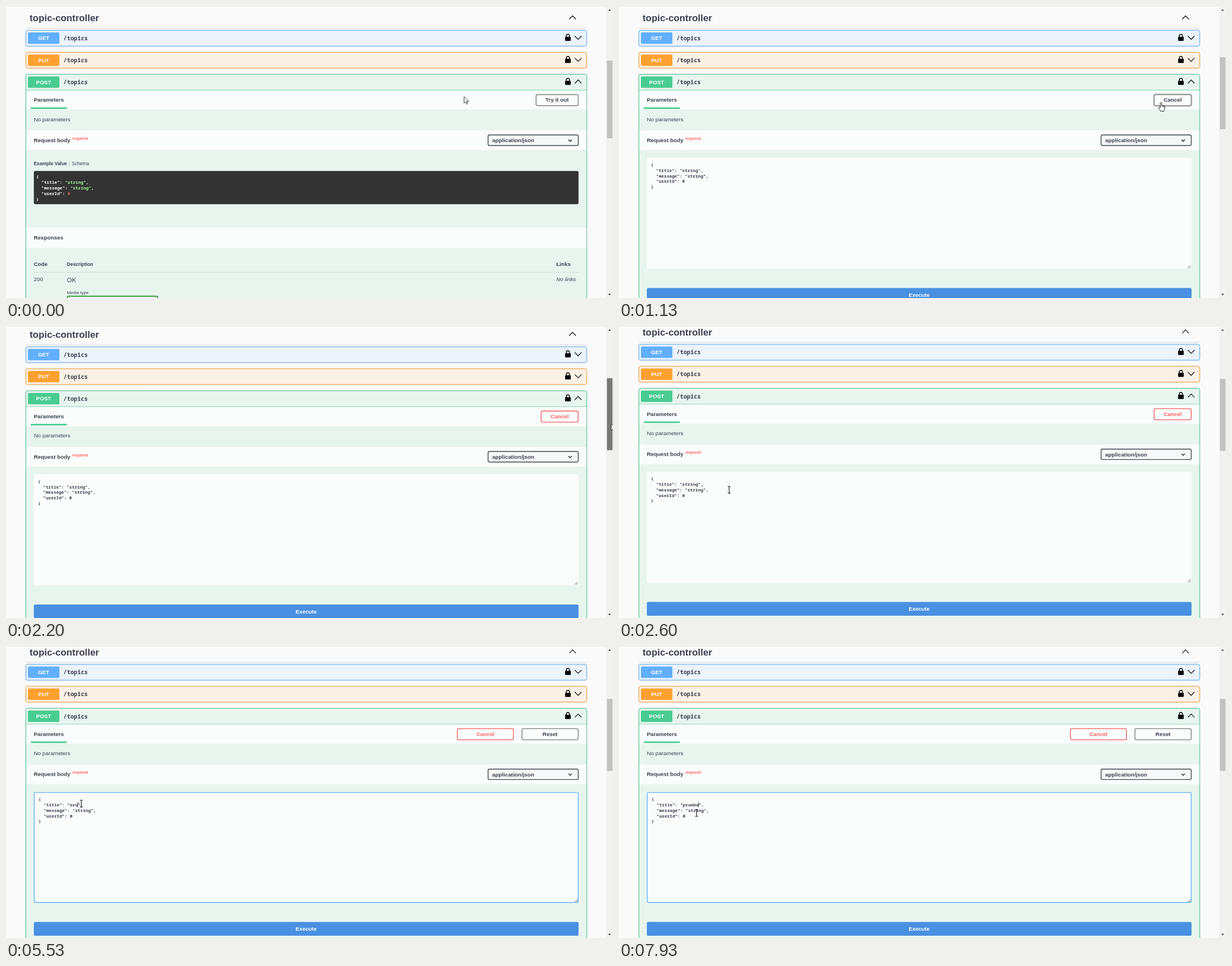
These frames come from a looping animation (1080 px wide and 519 px high, 8 s). An HTML page:

```html
<!DOCTYPE html>
<html lang="en">
<head>
<meta charset="utf-8">
<title>Topic API</title>
<style>
html, body { margin: 0; width: 100%; height: 100%; overflow: hidden; background: #fafafa; }
svg { display: block; width: 100%; height: 100%; font-family: "Liberation Sans", Arial, sans-serif; }
text { white-space: pre; fill: #3b4151; }
.b { font-weight: bold; }
.i { font-style: italic; }
.m { font-family: "Noto Sans Mono", monospace; font-weight: bold; }
.mid { text-anchor: middle; }
.bar { filter: drop-shadow(0 .7px .7px rgba(0,0,0,.13)); }
.row { filter: drop-shadow(0 0 1px rgba(0,0,0,.2)); }
.hover { filter: drop-shadow(0 0 1.8px rgba(0,0,0,.4)); }
</style>
</head>
<body>
<svg id="stage" viewBox="0 0 1080 519"></svg>
<script>
const stage = document.getElementById('stage');
const FPS = 15, TICKS = 120;
const OPEN = 17, FOCUS = 47, SELECT = 52, CHAR = 4.668;
const GREEN = '#49cc90', RED = [255, 96, 96], INK = [59, 65, 81], GRAY = [128, 128, 128];

// Keyframes: tick, then values
const pointer = [[0, 815, 161], [4, 870, 157.5], [8, 964.5, 171.5], [24, 964.5, 171.5], [27, 1076, 173],
  [31, 1076.5, 173], [33, 1077, 174], [35, 1077, 175], [39, 196, 291], [40, 196, 291], [44, 142, 282],
  [48, 134, 280], [108, 134, 280], [110, 145, 301.5], [114, 145, 301.5], [119, 138, 296.5]];
const scrolling = [[31, 0], [33, -6.3], [35, -10.6]];
const typing = [[66, 'r'], [69, 'ru'], [75, 'r'], [76, ''], [78, 'o'], [80, 'or'], [83, 'oru'], [88, 'or'],
  [90, 'o'], [92, ''], [94, 'p'], [95, 'pr'], [97, 'pru'], [99, 'prue'], [100, 'prueb'], [102, 'prueba']];

const clamp = v => Math.max(0, Math.min(1, v));
const mix = (a, b, p) => a + (b - a) * p;
const rgb = (a, b, p) => `rgb(${a.map((v, i) => Math.round(mix(v, b[i], p)))})`;

function at(keys, k) {
  let i = keys.findIndex(key => key[0] > k);
  if (i < 0) i = keys.length;
  const a = keys[Math.max(0, i - 1)], b = keys[Math.min(i, keys.length - 1)];
  const p = a === b ? 0 : clamp((k - a[0]) / (b[0] - a[0]));
  return a.slice(1).map((v, j) => mix(v, b[j + 1], p));
}

// y is the middle of the capitals
const text = (x, y, s, cls = '', size = 9.84, fill = '') =>
  `<text x="${x}" y="${y + size * .355}" class="${cls}" font-size="${size}"${fill && ` style="fill:${fill}"`}>${s}</text>`;
const rect = (x, y, x2, y2, fill, more = '') =>
  `<rect x="${x}" y="${y}" width="${x2 - x}" height="${y2 - y}" fill="${fill}" ${more}/>`;
const path = (d, stroke, width, fill = 'none') =>
  `<path d="${d}" fill="${fill}" stroke="${stroke}" stroke-width="${width}"/>`;
const chevron = (x, y, dir, w = 6, h = 3, width = 1.3, color = '#111') =>
  path(`M${x - w} ${y - h * dir}L${x} ${y + h * dir}L${x + w} ${y - h * dir}`, color, width);
const tint = (s, fill) => `<tspan style="fill:${fill}">${s}</tspan>`;

const code = (x, y, pitch, lines, fill) => lines.map((s, i) =>
  `<text x="${x}" y="${y + i * pitch}" class="m" font-size="7.78" style="fill:${fill}">${s}</text>`).join('');

const json = (title, message = 'string', str = s => s, num = s => s) =>
  ['{', `  "title": ${str(`"${title}"`)},`, `  "message": ${str(`"${message}"`)},`, `  "userId": ${num('0')}`, '}'];

function method(y, bottom, name, color, fill, dir) {
  return rect(35.5, y, 1033, bottom, fill, `rx="2.8" stroke="${color}" stroke-width="1" class="row"`) +
    rect(39, y + 3.8, 95, y + 24, color, 'rx="2"') +
    text(67, y + 13.7, name, 'b mid', 9.84, '#fff') +
    text(102.3, y + 14, '/topics', 'm', 10.3) +
    rect(995, y + 11.5 - 5, 1004.6, y + 18.5, '#000', 'rx="1" display="none"') +
    rect(994.8, y + 11.4, 1004.8, y + 18.8, '#000', 'rx="1"') +
    path(`M997 ${y + 12}v-2.2a2.8 2.8 0 0 1 5.6 0v2.2`, '#000', 1.5) +
    chevron(1018, y + 13, dir);
}

const bar = (y, y2, title) => rect(36, y, 1032.5, y2, '#fafdfc', 'class="bar"') +
  text(49.5, (y + y2) / 2 - .3, title, 'b');

const button = (x, x2, label, ink, border, cls = '') =>
  rect(x + .7, 157.5, x2 - .7, 177.2, '#fafdfc', `rx="2.6" stroke="${border}" stroke-width="1.4" class="${cls || 'bar'}"`) +
  text((x + x2) / 2, 167, label, 'b mid', 9.84, ink);

function buttons(k) {
  const hover = k >= 15 && k < 26 ? 'hover' : '';
  const ink = rgb(INK, INK, 0), gray = rgb(GRAY, GRAY, 0);
  if (k < OPEN) return button(942.5, 1018.7, 'Try it out', ink, gray, hover);
  if (k < 66) {
    const p = clamp((k - OPEN) / 5);
    return button(951.5, 1018.7, 'Cancel', rgb(INK, RED, p), rgb(GRAY, RED, p), hover);
  }
  const p = clamp((k - 66) / 5), grow = 34.5 * p * p * (3 - 2 * p);
  const red = rgb(RED, RED, 0);
  return button(802.5, 869 + grow, 'Cancel', red, red) + button(882.8 + grow, 1018.7, 'Reset', ink, gray);
}

function example() {
  const lines = json('string', 'string', s => tint(s, '#a2fca2'), s => tint(s, '#d36363'));
  return text(49.5, 280.3, 'Example Value', 'b', 8.44) +
    path('M112.7 276V285', '#b5bfbd', .8) +
    text(117, 280.3, 'Schema', '', 8.44) +
    rect(49.5, 293.3, 1018.7, 352.3, '#333', 'rx="2.8"') +
    code(53.7, 305.8, 10.1, lines, '#fff') +
    bar(394, 430, 'Responses') +
    text(49.5, 458.2, 'Code', 'b') + text(108.5, 458.8, 'Description', 'b', 8.44) + text(979, 458.2, 'Links', 'b') +
    path('M49.5 473.4H1018.7', '#c6d1d0', .8) +
    text(49.5, 486, '200') + text(108.5, 486.6, 'OK', '', 11.25) + text(979, 486, 'No links', 'i') +
    text(108.5, 509.2, 'Media type', '', 7.85) +
    rect(109, 515.8, 270, 535, '#f7f7f7', 'rx="2.8" stroke="#008000" stroke-width="1.4"');
}

function editor(k) {
  const focus = k >= FOCUS, shift = focus ? 1 : 0;
  const x = 56.7 + shift, y = 285.1 + shift, from = x + 12 * CHAR;
  const key = typing.filter(t => t[0] <= k).pop();
  const selected = k >= SELECT && !key;
  const title = key ? key[1] : selected ? tint('string', '#fff') : 'string';
  let out = rect(49.5, 270, 1018.7, 467, '#fafdfc', 'rx="2"');
  if (focus) out += rect(50.2, 271, 1018.1, 466.4, 'none', 'rx="2" stroke="#61affe" stroke-width="1.4"');
  if (selected) out += rect(from, 287.6, from + 6 * CHAR, 297.4, '#0078d7');
  out += code(x, y, 9.75, json(title), '#3b4151');
  if (focus && !selected) {
    const since = k - (key ? key[0] : FOCUS), caret = from + (key ? key[1].length : 4) * CHAR;
    if (Math.floor(since / 7.5) % 2 === 0) out += rect(caret - .3, 287.8, caret + .5, 297.4, '#222');
  }
  return out + path('M1011.8 466L1017.2 460.6M1014.8 466L1017.2 463.6', '#555', .9) +
    rect(49.5, 501.2, 1018.7, 525.7, '#4990e2', 'rx="2.6"') +
    text(534, 513.4, 'Execute', 'b mid', 9.84, '#fff');
}

function scrollbar(k, scroll) {
  const top = k < OPEN ? 97 : 91 - scroll * .28, length = k < OPEN ? 138 : 128;
  const fill = k >= 27 && k < 36 ? (k >= 31 ? '#787878' : '#a8a8a8') : '#c1c1c1';
  return rect(1068, 0, 1080, 519, '#f1f1f1') + rect(1069.2, top, 1079, top + length, fill) +
    path('M1071.5 8.5L1074 5.5L1076.5 8.5Z', 'none', 0, '#505050') +
    path('M1071.5 511.5L1074 514.5L1076.5 511.5Z', 'none', 0, '#505050');
}

const shapes = {
  arrow: path('M0 0V11.6L2.7 9.2L4.5 13.4L6.3 12.6L4.5 8.5H8Z', '#222', .9, '#fff'),
  hand: path('M-1.3 9V1.2a1.3 1.3 0 0 1 2.6 0V5.4l4 .8q1.5.4 1.4 2L6 12.2 5 15.6H-.8L-4.2 10.4q-.5-1.8 1-2z', '#222', 1, '#fff') +
    path('M1.3 5.4V8M3.3 6V8.4M5.2 6.4V8.8', '#222', .7),
  beam: path('M-2.6 -6H-.8L0 -5.4L.8 -6H2.6M0 -5.4V5.6M-2.6 6.2H-.8L0 5.6L.8 6.2H2.6', '#111', 1.1)
};

function cursor(k, scroll) {
  const [x, y] = at(pointer, k), pageY = y - scroll;
  const left = k < OPEN ? 943 : 952;
  let kind = 'arrow';
  if (x > left && x < 1019 && pageY > 157 && pageY < 178) kind = 'hand';
  if (k >= OPEN && x > 50 && x < 1018 && pageY > 270 && pageY < 467) kind = 'beam';
  return `<g transform="translate(${x} ${y})">${shapes[kind]}</g>`;
}

function draw(k) {
  const [scroll] = at(scrolling, k);
  stage.innerHTML = rect(0, 0, 1080, 519, '#fafafa') +
    `<g transform="translate(0 ${scroll})">` +
    text(42, 21.3, 'topic-controller', 'b', 16.87) + chevron(1008, 20.5, -1) +
    path('M35 39.3H1033', '#d0d2d5', .8) +
    method(43.3, 71.2, 'GET', '#61affe', '#ebf3fb', 1) +
    method(82.4, 110.2, 'PUT', '#fca130', '#faf1e6', 1) +
    method(121.5, 700, 'POST', GREEN, '#e8f5ef', -1) +
    path('M35.5 149.6H1033', GREEN, .8) +
    bar(150, 184.5, 'Parameters') + rect(44, 180.2, 108.5, 183, GREEN) + buttons(k) +
    text(49.5, 201.2, 'No parameters') +
    bar(221, 256.5, 'Request body') + text(118, 235.5, 'required', 'b', 7.03, '#f66') +
    rect(857.7, 229.3, 1018.2, 248, '#f7f9f8', 'rx="2.6" stroke="#41444e" stroke-width="1.4"') +
    text(865, 239, 'application/json', 'b') + chevron(1003.8, 239, 1, 3, 1.5, 1.3) +
    (k < OPEN ? example() : editor(k)) + '</g>' +
    rect(0, 0, 1080, 1, '#e9e9e9') + scrollbar(k, scroll) + cursor(k, scroll);
}

let shown = -1;
function frame() {
  // a few ms of slack so that rounded times land on their tick
  const k = Math.floor((performance.now() + 5) * FPS / 1000) % TICKS;
  if (k !== shown) draw(shown = k);
  requestAnimationFrame(frame);
}
frame();
</script>
</body>
</html>
```
